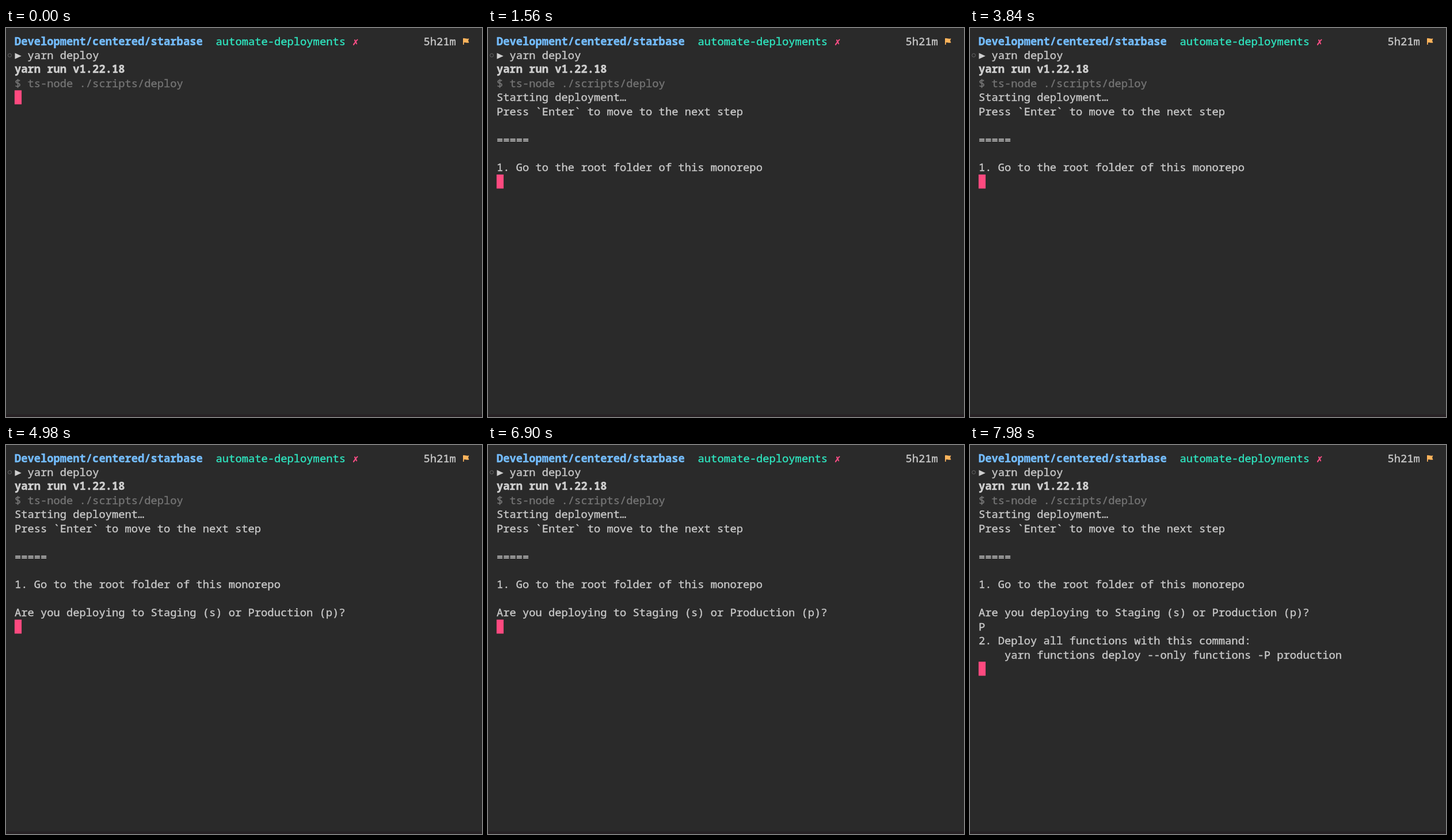
An HTML page for the animation above (8 s loop, 827 by 677 pixels).

```html
<!DOCTYPE html>
<html lang="en">
<head>
<meta charset="utf-8">
<title>Terminal deployment</title>
<style>
  html, body { margin: 0; width: 100%; height: 100%; overflow: hidden; background: #2a2a2a; }
  svg { display: block; width: 100%; height: 100%; }
  text {
    font: 500 18.8px "Noto Sans Mono", "DejaVu Sans Mono", monospace;
    color: #c9c9c9; fill: currentColor; stroke: currentColor; stroke-width: 0.4px;
    white-space: pre;
  }
  .bold { font-weight: 700; color: #d0d0d0; }
  .path { font-weight: 700; color: #74bdff; }
  .branch { color: #2fe6c0; }
  .dim { color: #747474; }
  .cross { font: 700 14px "DejaVu Sans", sans-serif; color: #ff4f87; }
</style>
</head>
<body>
<svg id="screen" viewBox="0 0 827 677">
  <rect width="827" height="677" fill="#2a2a2a"/>
  <rect y="672.5" width="827" height="4.5" fill="#272124"/>
  <circle cx="6.5" cy="47.5" r="3" fill="none" stroke="#686868"/>
  <path d="M15.5 43.4 L26.8 48.7 L15.5 54 Z" fill="#cfcfcf"/>
  <path d="M794 18 C797 17 800 19.5 804.5 18.3 L803 22 L804.5 25.5 C800 26.5 798 24.5 795.6 25.5 V29 H794 Z" fill="#ffb45c"/>
  <rect id="cursor" width="12.2" height="24.4" fill="#ff4a7f"/>
</svg>
<script>
const LOOP = 8000;
const LEFT = 14.9, TOP = 10.7, COL = 11.28, ROW = 24.43, BASELINE = 18.9;
const STARTED = 1440, ASKED = 4500, ANSWERED = 7020, COMMAND = 7200;

// [appears at, row, column, text, class]
const runs = [
  [0, 0, 0, "Development/centered/starbase", "path"],
  [0, 0, 31, "automate-deployments", "branch"],
  [0, 0, 52, "✗", "cross"],
  [0, 0, 63, "5h21m"],
  [0, 1, 2, "yarn deploy"],
  [0, 2, 0, "yarn run v1.22.18", "bold"],
  [0, 3, 0, "$ ts-node ./scripts/deploy", "dim"],
  [STARTED, 4, 0, "Starting deployment…"],
  [STARTED, 5, 0, "Press `Enter` to move to the next step"],
  [STARTED, 7, 0, "====="],
  [STARTED, 9, 0, "1. Go to the root folder of this monorepo"],
  [ASKED, 11, 0, "Are you deploying to Staging (s) or Production (p)?"],
  [ANSWERED, 12, 0, "P"],
  [COMMAND, 13, 0, "2. Deploy all functions with this command:"],
  [COMMAND, 14, 4, "yarn functions deploy --only functions -P production"],
];

// [from, row, column]
const cursorStops = [[0, 4, 0], [STARTED, 10, 0], [ASKED, 12, 0], [ANSWERED, 12, 1], [COMMAND, 15, 0]];

const screen = document.getElementById("screen");
const cursor = document.getElementById("cursor");
const colX = col => LEFT + col * COL;
const rowY = row => TOP + row * ROW;

const lines = runs.map(([start, row, col, content, style = ""]) => {
  const node = document.createElementNS("http://www.w3.org/2000/svg", "text");
  node.setAttribute("x", colX(col));
  node.setAttribute("y", rowY(row) + BASELINE);
  node.setAttribute("class", style);
  node.textContent = content;
  screen.append(node);
  return { start, node };
});

function draw(now) {
  const time = now % LOOP;
  for (const { start, node } of lines) node.style.display = time >= start ? "" : "none";
  const [, row, col] = cursorStops.filter(([from]) => time >= from).pop();
  cursor.setAttribute("x", colX(col));
  cursor.setAttribute("y", rowY(row));
}

const origin = performance.now();
function tick() {
  draw(performance.now() - origin);
  requestAnimationFrame(tick);
}
tick();
</script>
</body>
</html>
```
